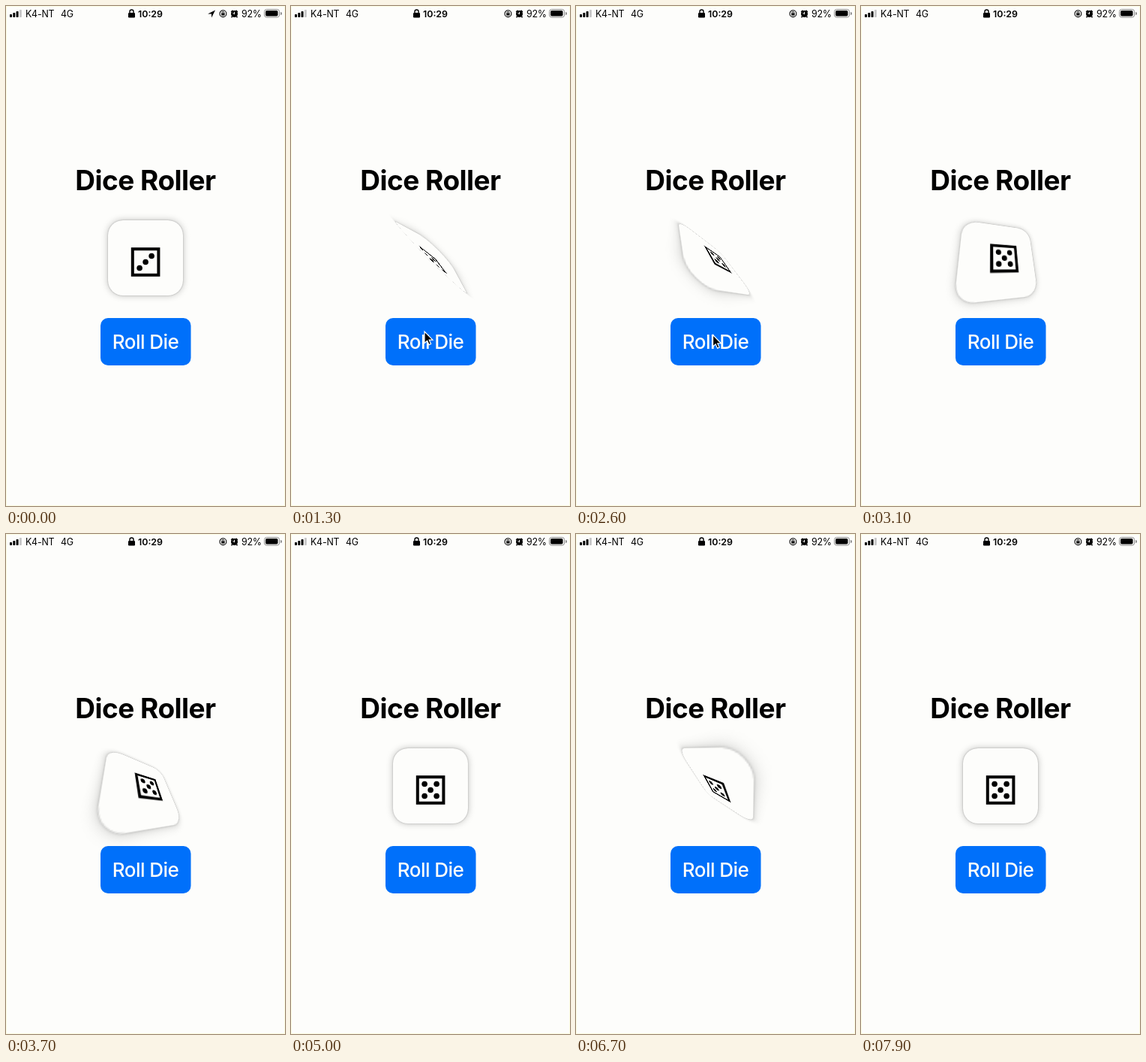
An HTML page for the animation above (8 s loop, 372 px wide and 665 px high).

```html
<!DOCTYPE html>
<html lang="en">
<head>
<meta charset="utf-8">
<title>Dice Roller</title>
<style>
  html, body { margin: 0; width: 100%; height: 100%; overflow: hidden; background: #fdfdfb; }
  #stage { position: relative; width: 372px; height: 665px; overflow: hidden; background: #fdfdfb; }
  svg { position: absolute; left: 0; top: 0; }
  text { font-family: Inter, Roboto, sans-serif; }
  .bar { font-size: 12.4px; }
  #die {
    position: absolute; left: 136px; top: 284.5px; width: 100px; height: 100px;
    border-radius: 20px; background: #fdfdfb;
    box-shadow: 0 0 2px rgba(0, 0, 0, .3), 0 0 10px rgba(0, 0, 0, .25);
  }
</style>
</head>
<body>
<div id="stage">
  <svg width="372" height="665">
    <rect x=".5" y=".5" width="371" height="664" fill="none" stroke="#fcfce2"/>
    <!-- status bar -->
    <rect x="5" y="11" width="3" height="4" rx=".8"/>
    <rect x="9.3" y="9" width="3" height="6" rx=".8"/>
    <rect x="13.6" y="7" width="3" height="8" rx=".8"/>
    <rect x="17.9" y="5" width="3" height="10" rx=".8" fill="#c8c8c8"/>
    <text class="bar" x="26" y="14.5" letter-spacing="-.2">K4-NT</text>
    <text class="bar" x="73" y="14.5" letter-spacing="-.3">4G</text>
    <rect x="163" y="9" width="9" height="6.5" rx="1.2"/>
    <path d="M165 9.5V7.5a2.5 2.5 0 0 1 5 0V9.5" fill="none" stroke="#000" stroke-width="1.4"/>
    <text class="bar" x="192.5" y="14.5" text-anchor="middle" font-weight="600">10:29</text>
    <path id="arrow" d="M269 10.6 279 5.5 274 15.5V10.6Z"/>
    <g fill="none" stroke="#000">
      <circle cx="289.4" cy="10.2" r="4.4" stroke-width="1.1"/>
      <path d="M288.1 10V8.8a1.3 1.3 0 0 1 2.6 0V10"/>
    </g>
    <rect x="287.2" y="9.6" width="4.4" height="3"/>
    <circle cx="304.5" cy="10.5" r="4.5"/>
    <path d="M300.2 8 302.5 5.8M308.8 8 306.5 5.8M301.5 14 300.5 15.2M307.5 14 308.5 15.2" stroke="#000" stroke-width="1.6"/>
    <path d="M304.5 7.8V10.8L302.5 9.5" fill="none" stroke="#fdfdfb"/>
    <text class="bar" x="314" y="14.5" letter-spacing="-.2">92%</text>
    <rect x="344.5" y="4.5" width="20" height="10.5" rx="3" fill="none" stroke="#8a8a8a"/>
    <rect x="346" y="6" width="16.5" height="7.5" rx="1.7"/>
    <path d="M366 8a2 2 0 0 1 0 4Z" fill="#8a8a8a"/>

    <text x="186" y="245" text-anchor="middle" font-size="37" font-weight="700" letter-spacing="-.52">Dice Roller</text>
    <g id="button">
      <rect x="126" y="415" width="120.5" height="63" rx="10" fill="#0070fa"/>
    </g>
    <text id="label" x="186" y="456" text-anchor="middle" font-size="26" font-weight="500" letter-spacing="-.55" fill="#fdfdfb">Roll Die</text>
  </svg>
  <div id="die">
    <svg width="100" height="100">
      <rect x="32.8" y="38.2" width="34.6" height="34.6" fill="none" stroke="#000" stroke-width="4"/>
      <g id="pips"></g>
    </svg>
  </div>
  <svg width="372" height="665">
    <path id="cursor" d="M0 0V15.5L3.6 12.2 6 17.6 8.6 16.5 6.2 11.2H11Z" stroke="#fff" stroke-width="1.2"/>
  </svg>
</div>
<script>
const $ = id => document.getElementById(id);
const clamp = v => Math.min(1, Math.max(0, v));

const taps = [1.145, 2.2, 5];
const visits = [
  { mid: 1.75, hold: .8, x: 178, y: 433 },
  { mid: 6.1, hold: .2, x: 240, y: 455 },
];

// One turn per tap, swinging past its end and settling within 2.8 s
function roll(t) {
  return t < 0 ? 0 : 360 * (1 - (1 - clamp(t / 2.8)) ** 1.3 * Math.cos(4.2 * t));
}

// The button dims for 0.2 s up to its release
const press = t => .26 * Math.sin(Math.PI * clamp(1 + t / .2));

const sumTaps = (f, t) => taps.reduce((sum, tap) => sum + f(t - tap), 0);

const pip = ([x, y]) => `<circle cx="${50.1 + 8 * x}" cy="${55.5 + 8 * y}" r="3.8"/>`;
const three = [[-1, 1], [0, 0], [1, -1]];
const five = [...three, [-1, -1], [1, 1]];

function moveCursor(t) {
  const visit = visits[t < 4 ? 0 : 1];
  const away = clamp((Math.abs(t - visit.mid) - visit.hold) / .35);
  const shift = 215 * away * away;
  $('cursor').style.display = away < 1 ? '' : 'none';
  $('cursor').setAttribute('transform', `translate(${visit.x + shift} ${visit.y + shift})`);
}

function draw(now) {
  const t = now / 1000 % 8;
  $('pips').innerHTML = (t < taps[1] ? three : five).map(pip).join('');
  $('die').style.transform = `perspective(100px) rotate3d(1, 1, 0, ${sumTaps(roll, t)}deg)`;
  $('button').style.opacity = $('label').style.opacity = 1 - sumTaps(press, t);
  $('arrow').style.display = t < 1 ? '' : 'none';
  moveCursor(t);
  requestAnimationFrame(draw);
}
requestAnimationFrame(draw);
</script>
</body>
</html>
```
